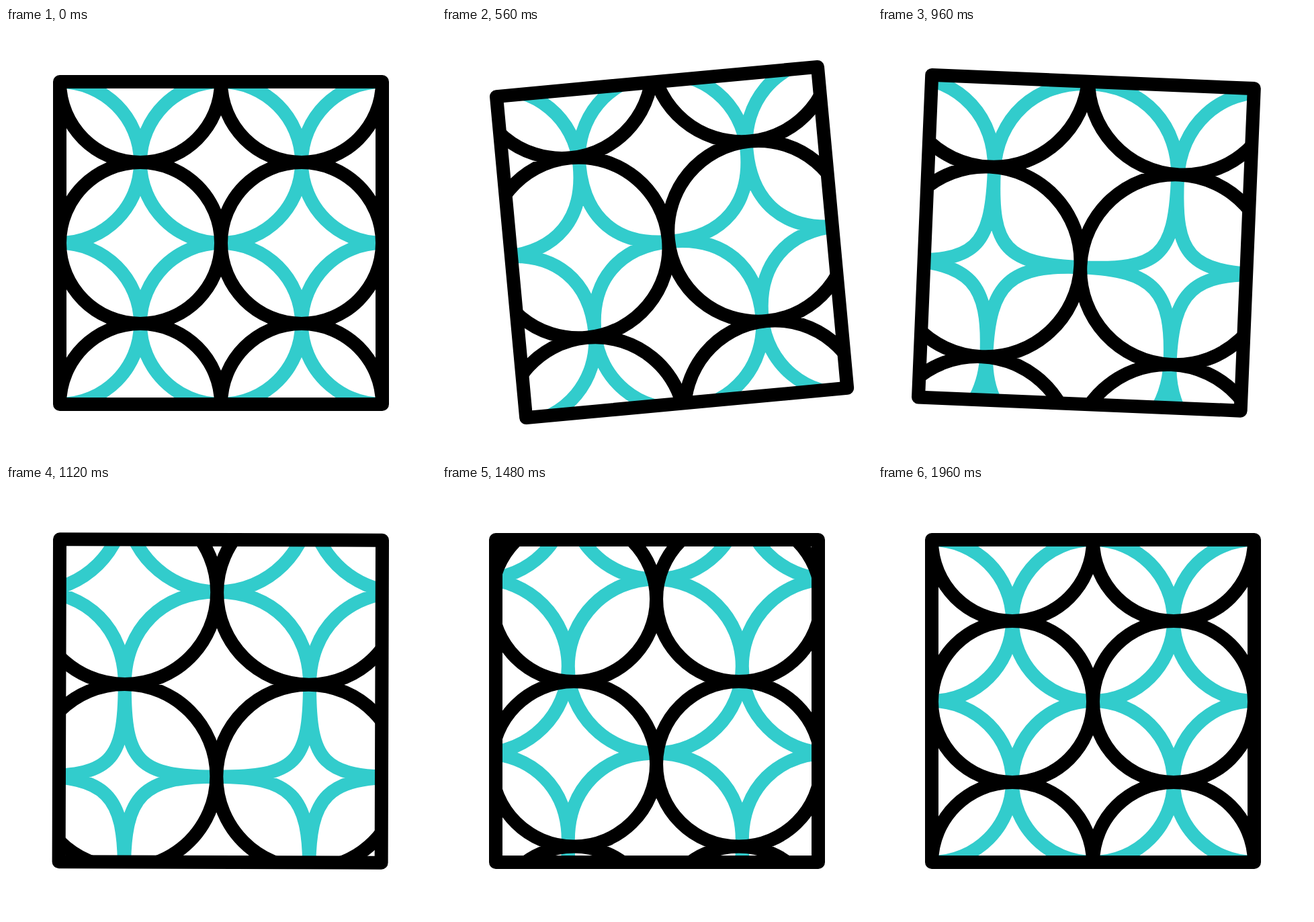
An HTML page that plays this animation: 640x640 px, repeating every 2 s.

```html
<!DOCTYPE html>
<html lang="en">
<head>
<meta charset="utf-8">
<title>Circle tiles</title>
<style>
  html, body { margin: 0; width: 100%; height: 100%; overflow: hidden; background: #fff; }
  svg { display: block; width: 100%; height: 100%; }
  path, .frame { fill: none; stroke: #000; stroke-width: 20; }
  #teal { stroke: #32cccc; }
  .frame { stroke-linejoin: round; }
</style>
</head>
<body>
<svg viewBox="0 0 640 640">
  <clipPath id="inside"><rect x="80" y="80" width="480" height="480"/></clipPath>
  <g id="tile">
    <g clip-path="url(#inside)">
      <path id="teal"/>
      <path id="black"/>
    </g>
    <rect class="frame" x="80" y="80" width="480" height="480"/>
  </g>
</svg>
<script>
const TICK = 40, TICKS = 50, ROUND = 0.5523;
const [tile, teal, black] = ['tile', 'teal', 'black'].map(id => document.getElementById(id));

// Keys are [tick, value] pairs, eased in and out between neighbours.
const SWING = [[2, 0], [8, 7], [15, -6], [22, 3], [29, 0]];
const BLACK_GROW = [[2, 0], [22, 0.184], [41.2, 0]];
const TEAL_GROW = [[7, 0], [27, 0.148], [48, 0]];
const SQUARE = [[7, 0], [27, 1]];
const SCROLL = [[18.9, 0], [47.1, 1]];

function ease(keys, t) {
  if (t <= keys[0][0]) return keys[0][1];
  for (let i = 1; i < keys.length; i++) {
    const [t0, a] = keys[i - 1], [t1, b] = keys[i];
    if (t < t1) {
      const u = (t - t0) / (t1 - t0);
      return a + (b - a) * u * u * (3 - 2 * u);
    }
  }
  return keys[keys.length - 1][1];
}

// A circle whose upper and lower halves can bulge towards a square.
function lobe(x, y, r, up, low) {
  const half = (dir, k) => {
    const h = r * k, e = y + dir * r;
    return `M${x - r} ${y}C${x - r} ${y + dir * h} ${x - h} ${e} ${x} ${e}` +
      `S${x + r} ${y + dir * h} ${x + r} ${y}`;
  };
  return half(-1, up) + half(1, low);
}

function layout(grow, pull, drop) {
  return { r: 120 * (1 + grow), x: 320 - pull * grow, y: 320 - pull * grow + drop };
}

function draw(t) {
  const scroll = ease(SCROLL, t), square = ease(SQUARE, t);
  const b = layout(ease(BLACK_GROW, t), 40, 481 * scroll);
  const c = layout(ease(TEAL_GROW, t), 34, 480 * scroll);
  let blackPath = '', tealPath = '';

  for (let row = -4; row <= 2; row++) {
    for (const side of [-1, 1])
      blackPath += lobe(b.x + side * b.r, b.y + 2 * row * b.r, b.r, ROUND, ROUND);

    let up = ROUND, low = ROUND;
    if (row === 0) { up += 0.04 * square; low += 0.3 * square; }
    if (row === 1) { up += 0.25 * square; low += 0.04 * square; }
    for (const col of [-1, 0, 1])
      tealPath += lobe(c.x + 2 * col * c.r, c.y + (2 * row - 1) * c.r, c.r, up, low);
  }

  black.setAttribute('d', blackPath);
  teal.setAttribute('d', tealPath);
  tile.setAttribute('transform', `rotate(${ease(SWING, t)} 320 80)`);
}

function play() {
  draw(Math.floor(performance.now() / TICK) % TICKS);
  requestAnimationFrame(play);
}
play();
</script>
</body>
</html>
```
